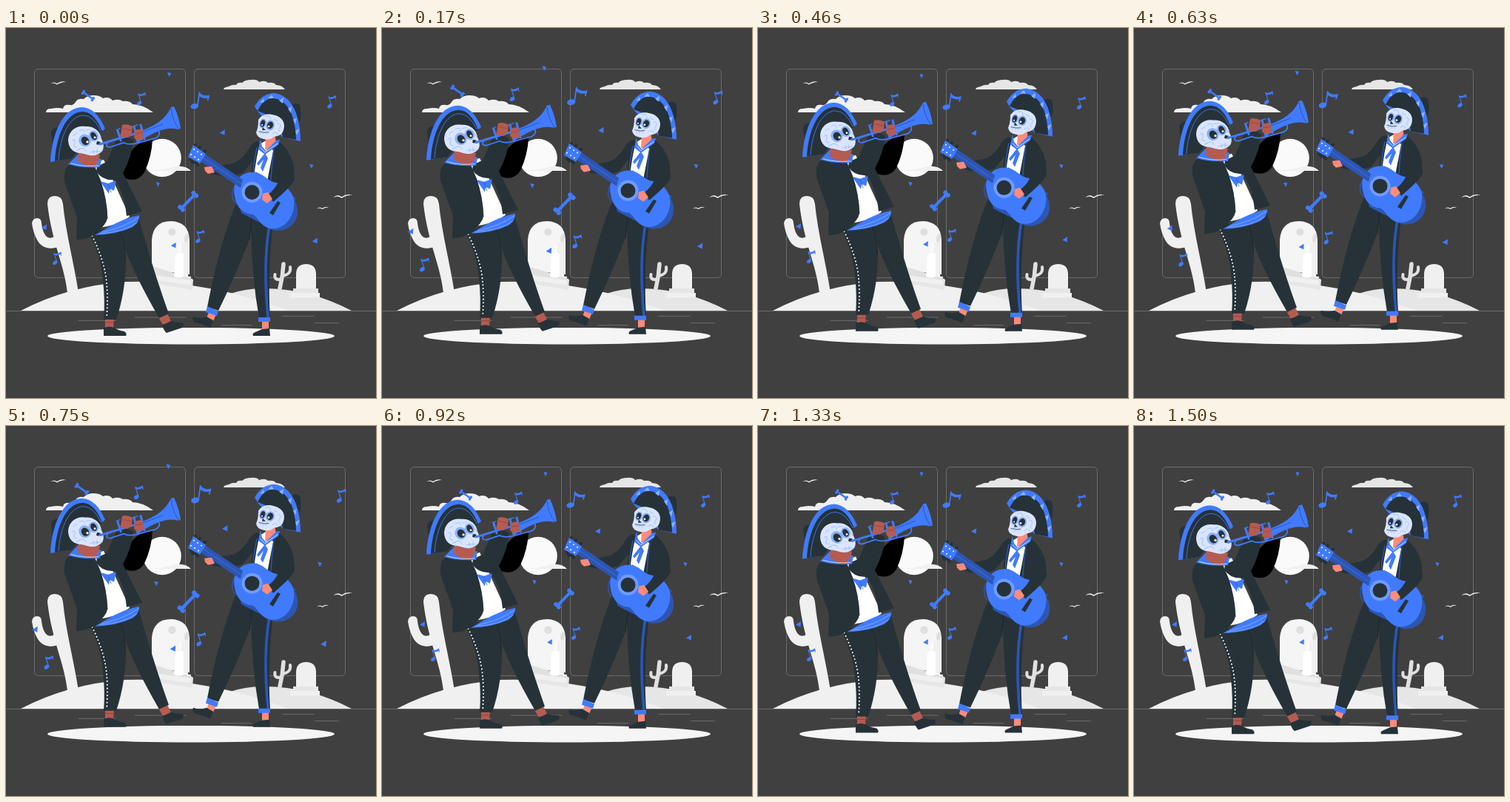
These frames come from a looping animation (500x500 px, 1540 ms). An HTML page with a canvas:

```html
<!DOCTYPE html>
<html lang="en">
<head>
<meta charset="utf-8">
<title>Musicians</title>
<style>
html, body { margin: 0; width: 100%; height: 100%; overflow: hidden; background: #404040; }
canvas { display: block; width: 100vw; height: 100vh; }
</style>
</head>
<body>
<canvas id="stage"></canvas>
<script>
const canvas = document.getElementById('stage');
const ctx = canvas.getContext('2d');
const LOOP = 1540;
const BLUE = '#407bff', NAVY = '#2d56b3', DARK = '#263238', SKULL = '#d9e5ff', MID = '#8cb0ff';
const BROWN = '#b55b52', SALMON = '#ff8b7b', WHITE = '#fff', FAINT = '#777';

const fill = (color, d) => { ctx.fillStyle = color; ctx.fill(new Path2D(d)); };
const line = (color, width, d) => {
  ctx.strokeStyle = color;
  ctx.lineWidth = width;
  ctx.stroke(new Path2D(d));
};
const oval = (color, x, y, rx, ry = rx, turn = 0) => {
  ctx.fillStyle = color;
  ctx.beginPath();
  ctx.ellipse(x, y, rx, ry, turn, 0, 7);
  ctx.fill();
};
const at = (x, y, turn, size, draw) => {
  ctx.save();
  ctx.translate(x, y);
  ctx.rotate(turn);
  ctx.scale(size, size);
  draw();
  ctx.restore();
};

function scenery() {
  ctx.lineCap = ctx.lineJoin = 'round';
  ctx.strokeStyle = FAINT;
  ctx.lineWidth = 0.8;
  for (const x of [38.5, 254.5]) {
    ctx.beginPath();
    ctx.roundRect(x, 55.5, 204, 282, 5);
    ctx.stroke();
  }
  line(FAINT, 0.8, 'M0 382.5H500M98 395.4H148M174 391H243M292 401.6H332M374 389.4H416M417 398.6H450');

  // Sky
  fill('#f0f0f0', 'M54 114Q54 109 61 109Q70 107 77 109Q78 103 86 104Q91 105 94 100Q97 95 105 96Q110 91 118 91Q127 91 131 95Q139 92 144 98Q152 95 158 99Q167 98 171 103Q184 103 199 114Z');
  fill('#e6e6e6', 'M294 83Q294 80 301 79Q306 76 311 77Q313 73 319 74Q323 70 331 70Q339 69 342 73Q350 70 354 74Q362 73 365 77Q373 77 377 83Z');
  oval('#fafafa', 211, 175.5, 25.8);
  fill('#f0f0f0', 'M188 193Q214 192 225 188Q241 184 250 193Z');
  const bird = 'M-11 2Q-6 -2.5 -1 1Q4 -3 11 -1Q4 -1 -1 2.5Q-6 -1 -11 2Z';
  at(70, 74, 0, 1, () => fill('#f0f0f0', bird));
  at(455, 227, 0, 1.2, () => fill('#f0f0f0', bird));
  at(428, 243, 0, 0.75, () => fill('#f0f0f0', bird));

  // Right-hand hill with its grave
  fill('#e6e6e6', 'M260 382Q300 352 346 352Q408 351 467 382Z');
  line('#e0e0e0', 5.5, 'M375 319Q374 336 370 352');
  line('#e0e0e0', 4, 'M363.5 333Q362 341 371 340M384 323Q386 333 373 335');
  fill('#f0f0f0', 'M392 352V333Q392 319 405.5 319Q419 319 419 333V352Z');
  fill('#e6e6e6', 'M388 352H422V358H388Z');
  fill('#f0f0f0', 'M384 358H424V364.5H384Z');

  // Left-hand hill
  fill('#f0f0f0', 'M20 382Q83 349 160 343Q268 339 382 382Z');
  fill('#f0f0f0', 'M56 238Q56 227 66 227Q76 227 77 238C81 278 92 318 98 358H83C79 320 62 290 56 238Z');
  fill('#f0f0f0', 'M35 264Q36 257 42 257Q48 257 48 264C50 281 58 291 71 277L75 294C62 300 50 299 43 288Q37 278 35 264Z');
  fill('#f5f5f5', 'M197 327V286Q199 261 223 261Q247 262 248 286V333Z');
  oval('#e0e0e0', 224.5, 275.5, 5.3);
  fill('#e6e6e6', 'M198 322L253 340L252 354L193 344Z');
  fill('#f0f0f0', 'M196 328L250 336L249 347L194 340Z');
  fill('#e0e0e0', 'M201 323L252 339V341L201 334Z');
  fill('#f0f0f0', 'M237 290H246V336H237Z');
  fill('#fff', 'M229 306Q234 302 240 305V336Q233 339 227 336Z');
  oval('#fafafa', 235, 298, 2.5, 6, 0.2);
  oval('#e0e0e0', 244, 284, 3, 6, 0.2);
  oval('#f5f5f5', 250, 416.2, 194, 11.3);
}

function leftSkull() {
  fill(SKULL, 'M84 151C85 138 96 131 107 133C119 132 128 140 129 150C133 157 133 166 127 169C117 176 110 170 99 169C89 168 84 160 84 151Z');
  oval(MID, 106.5, 152, 8, 8.5, -0.6);
  oval(MID, 118.5, 146, 6.5, 7.5, -0.4);
  oval(DARK, 107, 152.5, 5, 6, -0.6);
  oval(DARK, 118.5, 146, 3.8, 5.6, -0.5);
  oval(WHITE, 110, 154, 1.6);
  oval(WHITE, 120, 148, 1.4);
  fill(DARK, 'M123 153L128 154L125 158L122 157Z');
  line(MID, 0.7, 'M114 168Q121 166 128 167M118 165L119 170M123 164V169M89 153Q94 147 93 156Q89 161 96 161M98 164Q106 160 108 166M99 139Q106 135 106 141M91 145L96 142M108 138L114 137M126 146L128 150M95 166L99 164');
}

function trumpet() {
  line(BLUE, 3, 'M127 157L187 139');
  line(BLUE, 1.8, 'M139 153Q132 161 141 161L159 155M159 155Q166 159 180 155L202 149Q210 145 206 138Q203 134 195 138');
  fill(BLUE, 'M175 142C199 133 214 126 223 107L227 106Q234 121 236 136L232 137C218 133 200 140 178 155Z');
  line(NAVY, 1, 'M223 109Q225 125 233 136');
  line(BLUE, 3, 'M151 139L155 152M173 133L178 154M182 131L187 150');
  line(BLUE, 1.3, 'M164 136L178 131M149 138L154 136');
  line(NAVY, 1, 'M176 143Q198 136 212 130');
}

function trumpeter() {
  fill('#000', 'M155 190L170 165Q182 151 198 150Q197 174 187 195Q181 205 170 205Q160 205 155 198Z');
  // Legs
  fill(BROWN, 'M134 391H146L145 405H134ZM206 391L218 386L223 396L212 401Z');
  line('#8f443e', 1, 'M134 398H145');
  fill(DARK, 'M132 405Q140 402 146 405Q152 409 160 410Q164 413 162 416H132Z');
  fill(DARK, 'M211 401Q218 400 223 396Q231 399 239 398Q241 403 238 405L217 412Q213 409 211 401Z');
  fill(DARK, 'M113 278Q129 311 131 341Q134 368 132 394H149Q163 352 162 306L160 296Q173 333 207 392L220 386C208 352 196 316 179 256Z');
  line('#1e282d', 1, 'M155 276Q161 291 161 311');
  ctx.setLineDash([0.1, 4.7]);
  line(WHITE, 2, 'M116.5 281Q134 317 136 345Q138 366 136 392');
  ctx.setLineDash([]);

  // Torso
  fill(WHITE, 'M115 184L132 178L167 255Q151 267 125 270Z');
  fill(BLUE, 'M120 280L137 270Q159 257 180 253Q181 262 171 269Q150 279 120 280Z');
  line(MID, 0.8, 'M130 276Q159 270 179 256M126 278Q160 276 177 263');
  fill(DARK, 'M86 185Q77 190 79 208L96 256L95 286Q110 287 122 277Q136 265 137 257Q136 231 128 206L120 187Z');
  fill(BLUE, 'M127 207L138 210L149 206L146 220L140 217L139 224Z');
  line(NAVY, 0.7, 'M138 211L142 222');
  fill(DARK, 'M123 187L136 181L152 145Q163 146 172 152Q170 174 158 196L184 248L163 254Q161 226 147 205Q131 207 122 194Z');
  line('#1a2428', 0.8, 'M127 206Q136 229 137 257');
  fill(BLUE, 'M84 184L98 170L129 177L127 188Q103 190 84 184Z');
  fill(BROWN, 'M98 168L127 171Q125 184 118 188Q110 188 97 180Z');
  line(WHITE, 0.7, 'M88 183Q105 188 125 186');

  // Hat and head
  fill(DARK, 'M71 134Q62 135 61 142L63 158L77 148Z');
  fill(BLUE, 'M60 181C62 144 76 107 103 107Q122 108 134 136L129 140L87 177Z');
  fill(DARK, 'M66 180C68 146 81 113 104 113Q120 114 130 140L114 149L88 177Z');
  line(BLUE, 0.9, 'M71 178C73 146 86 118 105 118Q119 119 128 139');
  leftSkull();
  trumpet();
  fill(BROWN, 'M155 143L157 131Q164 129 171 133L170 143L165 148Q158 148 154 146ZM174 138L184 136L187 149L177 152L173 148Z');
  line('#8f443e', 0.8, 'M158 136L169 138M175 143L184 142');
}

function rightSkull() {
  fill(SKULL, 'M341 124C346 116 355 115 364 118C374 121 378 129 375 138Q373 146 362 147Q357 152 348 150Q339 148 338 141Q341 135 341 124Z');
  oval(MID, 357, 131.5, 6, 7, 0.3);
  oval(MID, 347, 129, 4.5, 6.5, 0.3);
  oval(DARK, 357, 131.5, 4, 5, 0.4);
  oval(DARK, 347, 129, 3, 4.7, 0.3);
  oval(WHITE, 355, 133, 1.3);
  oval(WHITE, 346, 131, 1);
  fill(DARK, 'M347 134L351 138L346 138Z');
  line(DARK, 0.8, 'M342 140Q349 142 355 141');
  line(MID, 0.7, 'M344 139V143M348 139V144M352 139V144M367 129Q373 129 370 135Q366 138 370 140M351 120Q357 117 358 123M362 123L367 126M360 143Q366 138 367 144');
}

function guitar() {
  oval(NAVY, 366, 246, 29, 27, 0.65);
  fill(NAVY, 'M310 213Q315 193 339 195L392 230L357 269Q332 258 318 250Z');
  fill(BLUE, 'M309 227C305 209 316 196 331 195C348 194 351 206 365 209C382 213 392 227 389 242C387 259 374 272 360 271C345 270 342 258 334 252C319 251 311 241 309 227Z');
  oval('#6f9cff', 332.5, 222, 14);
  oval(DARK, 332.5, 222, 10);
  fill(NAVY, 'M267 169L320 205L317 216L261 179Z');
  line(BLUE, 0.7, 'M266 175L323 214');
  line(DARK, 4, 'M256 158L253 162M262 161L259 165M269 166L266 169M250 178L253 182M256 181L259 185');
  fill(BLUE, 'M253 158L270 170L262 183L246 174Z');
  for (let i = 0; i < 3; i++) {
    oval(WHITE, 254 + 5 * i, 164 + 3.4 * i, 1);
    oval(WHITE, 250 + 5 * i, 171 + 3.4 * i, 1);
  }
  fill(DARK, 'M367 234L371 236L361 253L356 250Z');
}

function guitarist() {
  // Legs
  fill(SALMON, 'M274 384L284 387L280 396L271 392ZM346 395H355V408H346Z');
  fill(DARK, 'M253 390Q262 393 271 390L280 395L276 405Q263 399 255 398Q251 394 253 390ZM346 407L356 406L357 416H334Q332 413 337 411Z');
  fill(DARK, 'M310 239Q288 294 272 377L287 382Q310 335 328 288L331 271Q332 336 342 392H357Q353 333 361 264L330 234Z');
  line('#1b252a', 1, 'M333 249Q331 268 329 286');
  line(NAVY, 3.6, 'M356 267Q347 319 354 390');
  fill(BLUE, 'M272 376L287 383L285 389L270 384ZM341 391H357V397H341Z');

  // Jacket and shirt
  fill(DARK, 'M339 153Q331 156 327 165Q317 180 306 183L278 188L281 198Q301 203 320 196L333 180L329 218H377Q391 201 389 187Q384 165 368 153L353 164Z');
  fill(WHITE, 'M343 157Q338 175 335 202L353 207L361 166L353 151Z');
  fill(SALMON, 'M351 147L363 142L365 155Q357 166 350 164Z');
  fill(BLUE, 'M344 150L341 164L350 171L368 158L370 151L365 152L351 166L346 160Z');
  line(WHITE, 0.8, 'M344 162L350 168L367 156');
  fill(BLUE, 'M346 174L350 169L354 176L347 194L344 189L348 178L341 186L339 183Z');
  line(NAVY, 1.4, 'M339 162Q334 184 334 204M362 164Q359 184 358 205M309 214Q302 225 309 236');
  guitar();
  fill(SALMON, 'M268 188L278 187L282 195L273 197L269 193Z');
  line('#e46f61', 0.6, 'M269 192L274 191');
  fill(DARK, 'M370 164Q390 178 390 205Q384 216 361 235L354 225Q363 219 369 206L366 186Z');
  fill(SALMON, 'M347 224L354 222L360 231L353 237L346 232Z');

  // Hat and head
  fill(DARK, 'M383 106Q391 99 397 104Q400 114 397 127Z');
  fill(BLUE, 'M336 106Q346 88 363 88Q383 91 392 115Q398 133 398 153L374 148L341 114Z');
  fill(DARK, 'M340 112Q348 95 361 95Q379 97 387 119Q392 136 392 151L374 148L370 124Z');
  fill(MID, 'M343 101L348 95L349 100ZM354 95L359 90L362 95ZM369 98L375 94L374 102ZM381 109L386 106L385 115ZM388 124L393 121L391 130ZM391 139L397 136L393 145Z');
  rightSkull();
}

// A note hangs from a wavy flag that ends in a short drop
function note(x, y, turn, size) {
  at(x, y, turn, size, () => {
    oval(BLUE, -6.5, 7, 5.2, 3.6, -0.2);
    line(BLUE, 1.6, 'M-2.5 6.5L0 -11M12.5 -6L11 -1');
    fill(BLUE, 'M-0.8 -12Q5 -5 13.5 -8L13 -4Q5 -2 -0.8 -7Z');
  });
}

function bone(x, y, turn, half, width) {
  at(x, y, turn, 1, () => {
    line(BLUE, width, `M${-half} 0H${half}`);
    for (const side of [-1, 1]) {
      oval(BLUE, side * half, -width * 0.65, width * 0.72);
      oval(BLUE, side * half, width * 0.65, width * 0.72);
    }
  });
}

function confetti(scale) {
  ctx.save();
  ctx.translate(240, 186);
  ctx.scale(scale, scale);
  ctx.translate(-240, -186);
  note(261, 100, 0, 1);
  for (const [x, y] of [[183, 97], [436, 101], [261, 280], [71, 309]]) note(x, y, -0.45, 0.66);
  bone(113, 93, 0.62, 7.8, 2.5);
  bone(246, 233.5, -0.8, 13, 4);
  for (const [x, y] of [[55, 268], [292, 142], [227, 292], [415, 286]])
    at(x, y, 0, 1, () => fill(BLUE, 'M-4 .5L3 -4L2.5 3.5Z'));
  for (const [x, y] of [[221, 65], [410, 187], [206, 211]])
    at(x, y, 0, 1, () => fill(BLUE, 'M-2.8 -3L2.5 -2L0 3Z'));
  ctx.restore();
}

// Two quick beats, then a rest
function beat(p) {
  const spans = [[0, 0.1, 0.3], [0.4, 0.5, 0.6]];
  for (const [start, peak, end] of spans) {
    if (p > start && p < end) {
      return 1 + 0.1 * (p < peak ? (p - start) / (peak - start) : (end - p) / (end - peak));
    }
  }
  return 1;
}

function render(now) {
  const side = Math.min(innerWidth, innerHeight);
  const pixels = Math.round(side * devicePixelRatio);
  if (canvas.width !== pixels) {
    canvas.width = canvas.height = pixels;
    canvas.style.width = canvas.style.height = side + 'px';
  }
  ctx.setTransform(pixels / 500, 0, 0, pixels / 500, 0, 0);
  ctx.fillStyle = '#404040';
  ctx.fillRect(0, 0, 500, 500);

  // Motion advances at 24 steps per second
  const step = Math.min(36, Math.floor((now % LOOP + 5) * 0.024));
  const phase = Math.min(1, (step * 1000 / 24 + 25) / 1500);
  const lift = 10 * (1 - Math.abs(2 * phase - 1));

  scenery();
  ctx.save();
  ctx.translate(0, 0.3 - lift);
  guitarist();
  trumpeter();
  ctx.restore();
  confetti(beat(phase));
}

const began = performance.now();
function tick() {
  render(performance.now() - began);
  requestAnimationFrame(tick);
}
tick();
</script>
</body>
</html>
```
